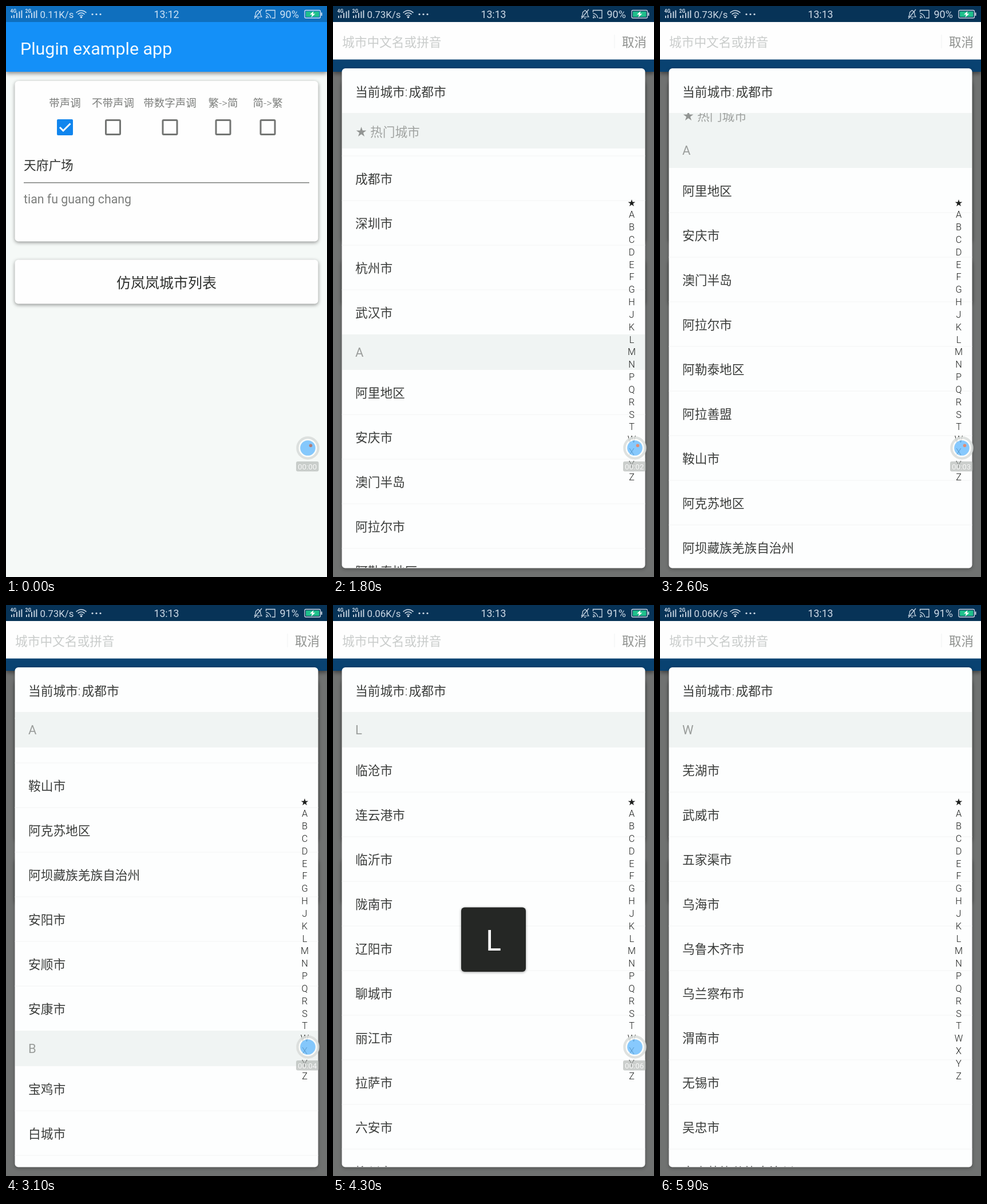
An HTML page with a canvas that plays this animation: 561x998 px, repeating every 6000 ms.

```html
<!DOCTYPE html>
<html lang="zh-CN">
<head>
<meta charset="utf-8">
<title>Plugin example app</title>
<style>
  html, body { margin: 0; width: 100%; height: 100%; overflow: hidden; background: #f5f9f7; }
  canvas { display: block; width: 561px; height: 998px; }
</style>
</head>
<body>
<canvas id="stage" width="561" height="998"></canvas>
<script>
const ctx = document.getElementById('stage').getContext('2d');
const FONT = 'Roboto, "Noto Sans CJK SC", "Noto Sans CJK", sans-serif';
const LOOP = 6000, STEP = 100;
const LIST_TOP = 187, LIST_END = 982, HEAD = 62, ROW = 78;
const LETTERS = '★ABCDEFGHJKLMNPQRSTWXYZ';

// A trailing dot marks a full name; all others get 市.
const CITIES = {
  '★': '北京 广州 成都 深圳 杭州 武汉',
  A: '阿里地区. 安庆 澳门半岛. 阿拉尔 阿勒泰地区. 阿拉善盟. 鞍山 阿克苏地区. 阿坝藏族羌族自治州. 安阳 安顺 安康',
  B: '宝鸡 白城 蚌埠 保定 包头 北海 本溪 滨州 亳州 百色 白山 巴中 保山 白银',
  C: '成都 长沙 重庆 长春 常州 沧州 承德 赤峰 常德 郴州 潮州 滁州 池州 长治',
  D: '大连 东莞 大庆 德州 东营 丹东 大同 德阳 达州 定西 儋州',
  E: '鄂尔多斯 鄂州 恩施土家族苗族自治州.',
  F: '福州 佛山 抚顺 阜新 阜阳 抚州 防城港',
  G: '广州 贵阳 桂林 赣州 广元 广安 贵港 固原 甘孜藏族自治州. 果洛藏族自治州.',
  H: '杭州 合肥 哈尔滨 海口 惠州 湖州 邯郸 衡水 淮安 黄山 菏泽 鹤壁 黄石 衡阳',
  J: '济南 嘉兴 金华 吉林 锦州 晋中 晋城 江门 揭阳 荆州 九江 焦作 济宁',
  K: '昆明 开封 克拉玛依 喀什地区. 可克达拉 昆玉',
  L: '临沧 连云港 临沂 陇南 辽阳 聊城 丽江 拉萨 六安 柳州 洛阳 兰州 廊坊',
  M: '绵阳 马鞍山 茂名 梅州 眉山 牡丹江',
  N: '南京 宁波 南宁 南昌 南通 南充 南阳 内江 宁德 南平 那曲',
  P: '莆田 萍乡 平顶山 濮阳 盘锦 攀枝花 普洱 平凉',
  Q: '青岛 泉州 秦皇岛 衢州 齐齐哈尔 清远 曲靖 钦州 庆阳 七台河',
  R: '日照 日喀则',
  S: '上海 深圳 苏州 沈阳 石家庄 绍兴 汕头 三亚 十堰 商丘 上饶 宿迁',
  T: '天津 太原 唐山 台州 泰州 泰安 通辽 铁岭 铜陵 天水 铜仁',
  W: '芜湖 武威 五家渠 乌海 乌鲁木齐 乌兰察布 渭南 无锡 吴忠 文山壮族苗族自治州. 武汉 潍坊 威海 温州',
  X: '西安 厦门 徐州 湘潭 襄阳 咸阳 邢台 新乡 许昌 信阳',
  Y: '扬州 烟台 银川 宜昌 岳阳 运城 盐城 玉林 宜宾 延安',
  Z: '郑州 珠海 中山 镇江 淄博 株洲 漳州 湛江 肇庆 遵义'
};

let listY = 0;
const sections = [...LETTERS].map(key => {
  const rows = CITIES[key].split(' ').map(n => n.endsWith('.') ? n.slice(0, -1) : n + '市');
  const top = listY;
  listY += HEAD + rows.length * ROW;
  return { key, rows, top, end: listY };
});

const SCROLL = [[1700, 0], [1800, 143], [2600, 496], [3100, 971], [3500, 1130]];
const SCRUB = [[3600, 1], [3700, 1], [4300, 11], [5100, 19]];
const TICKS = [400, 1100, 1900, 2700, 3400, 4100, 4800, 5500];
const BLINKS = [300, 700, 900, 1200, 1900, 2300, 2700, 3400, 4100, 4500, 4800, 5500];

function track(points, t) {
  if (t <= points[0][0]) return points[0][1];
  for (let i = 1; i < points.length; i++) {
    const [t0, a] = points[i - 1], [t1, b] = points[i];
    if (t <= t1) return a + (b - a) * (t - t0) / (t1 - t0);
  }
  return points[points.length - 1][1];
}
const passed = (times, t) => times.filter(x => x <= t).length;

function rect(x, y, w, h, color) {
  ctx.fillStyle = color;
  ctx.fillRect(x, y, w, h);
}
function round(x, y, w, h, r, color) {
  ctx.fillStyle = color;
  ctx.beginPath();
  ctx.roundRect(x, y, w, h, r);
  ctx.fill();
}
function disc(x, y, r, color) {
  ctx.fillStyle = color;
  ctx.beginPath();
  ctx.arc(x, y, r, 0, 7);
  ctx.fill();
}
function line(points, color, width) {
  ctx.strokeStyle = color;
  ctx.lineWidth = width;
  ctx.beginPath();
  points.forEach(([x, y]) => ctx.lineTo(x, y));
  ctx.stroke();
}
function arc(x, y, r, from, to, color, width) {
  ctx.strokeStyle = color;
  ctx.lineWidth = width;
  ctx.beginPath();
  ctx.arc(x, y, r, from, to);
  ctx.stroke();
}
// y is the optical middle of the text.
function text(s, x, y, size, color, align = 'left', weight = 300) {
  ctx.font = `${weight} ${size}px ${FONT}`;
  ctx.textAlign = align;
  ctx.fillStyle = color;
  ctx.fillText(s, x, y + size * 0.35);
}
function shadowed(draw, blur, dy, color) {
  ctx.save();
  ctx.shadowColor = color;
  ctx.shadowBlur = blur;
  ctx.shadowOffsetY = dy;
  draw();
  ctx.restore();
}
const card = (y, h) =>
  shadowed(() => round(15.5, y, 530, h, 6, '#fefefe'), 6, 2, 'rgba(0,0,0,.42)');

function checkbox(x, on) {
  if (on) {
    round(x - 14, 198, 28, 28, 2, '#1085ee');
    line([[x - 9, 212], [x - 3, 218], [x + 9.5, 205.5]], '#fff', 3);
  } else {
    ctx.strokeStyle = '#737573';
    ctx.lineWidth = 3;
    ctx.beginPath();
    ctx.roundRect(x - 12.5, 199.5, 25, 25, 1.5);
    ctx.stroke();
  }
}

function drawHome() {
  rect(0, 0, 561, 998, '#f5f9f7');
  shadowed(() => rect(0, 28, 561, 87, '#1490f8'), 7, 3, 'rgba(0,0,0,.45)');
  rect(0, 0, 561, 28, '#0f6fbe');
  text('Plugin example app', 25, 74, 30.4, '#f4faff', 'left', 400);

  card(131, 280.5);
  [['带声调', 103], ['不带声调', 187], ['带数字声调', 286.5], ['繁->简', 379.5], ['简->繁', 457.5]]
    .forEach(([label, x], i) => {
      text(label, x, 170, 18.5, '#7c7e7c', 'center');
      checkbox(x, i === 0);
    });
  text('天府广场', 31, 278, 21.7, '#303230');
  rect(31, 308, 499, 1.6, '#858785');
  text('tian fu guang chang', 31, 338, 21.35, '#7c7e7c', 'left', 400);

  card(443.5, 77);
  text('仿岚岚城市列表', 280.5, 484, 25, '#303230', 'center');
}

function drawStatus(t) {
  const c = 'rgba(240,247,255,.85)';
  [['4G', 8], ['2G', 34]].forEach(([name, x]) => {
    text(name, x - 0.5, 9.5, 8.5, c, 'left', 600);
    [[1, 4], [5, 5.5], [10, 9], [14.5, 11.5], [18.5, 13.5]]
      .forEach(([dx, h]) => rect(x + dx, 21 - h, 1.8, h, c));
  });
  const speed = t < 1400 ? '0.11' : t < 3400 ? '0.73' : '0.06';
  text(speed + 'K/s', 59.5, 15, 16.8, c, 'left', 400);
  [4, 8, 12].forEach(r => arc(131.5, 20, r, -2.4, -0.74, c, 1.6));
  disc(131.5, 19.5, 1.8, c);
  [151, 158, 165].forEach(x => disc(x, 14.5, 1.6, c));
  text(t < 1100 ? '13:12' : '13:13', 280.5, 15, 17.7, c, 'center', 400);

  line([[434, 19], [436, 16], [436.5, 11], [440.5, 7.5], [444.5, 11], [445, 16], [447, 19], [434, 19]], c, 1.2);
  line([[434, 22], [447, 6]], c, 1.2);
  line([[439, 21.5], [442, 21.5]], c, 1.2);
  line([[454.5, 11], [454.5, 7.5], [470, 7.5], [470, 21], [464.5, 21]], c, 1.3);
  [4, 8].forEach(r => arc(454.5, 21, r, -1.57, 0, c, 1.3));
  disc(455.3, 20.2, 1.3, c);
  text(t < 2900 ? '90%' : '91%', 478.5, 15, 18, c, 'left', 400);

  ctx.strokeStyle = c;
  ctx.lineWidth = 1.3;
  ctx.beginPath();
  ctx.roundRect(522, 7.5, 27.5, 13.5, 2);
  ctx.stroke();
  rect(550.5, 11.5, 2, 5.5, c);
  rect(524, 9.5, 23.5, 9.5, '#20c08c');
  ctx.fillStyle = '#fff';
  ctx.beginPath();
  [[537.5, 9], [531, 15], [535, 15], [533.5, 20], [540.5, 13.5], [536.5, 13.5]]
    .forEach(([x, y]) => ctx.lineTo(x, y));
  ctx.fill();
}

function drawHeader(key, y) {
  rect(16, y, 529, HEAD, '#f0f4f3');
  if (key === '★') {
    text('★', 49.5, y + 33, 19, '#929593', 'center');
    text('热门城市', 65, y + 33, 21.7, '#a0a3a1');
  } else {
    text(key, 39, y + 31.5, 22, '#9a9d9b', 'left', 400);
  }
}

function drawList(scroll) {
  ctx.save();
  ctx.beginPath();
  ctx.rect(15, LIST_TOP, 531, LIST_END - LIST_TOP);
  ctx.clip();
  const base = LIST_TOP - scroll;
  let pinned = sections[0];
  for (const s of sections) {
    if (s.top <= scroll) pinned = s;
    if (base + s.end < LIST_TOP || base + s.top > LIST_END) continue;
    drawHeader(s.key, base + s.top);
    s.rows.forEach((name, i) => {
      const y = base + s.top + HEAD + i * ROW;
      if (y + ROW < LIST_TOP || y > LIST_END) return;
      text(name, 39, y + 40.8, 21.7, '#3a3c3a');
      if (i < s.rows.length - 1) rect(15, y + ROW - 0.5, 531, 1, '#f3f6f5');
    });
  }
  drawHeader(pinned.key, Math.min(LIST_TOP, base + pinned.end - HEAD));
  ctx.restore();
}

function drawPicker(t) {
  const scrub = t >= 3600;
  const section = sections[Math.round(track(SCRUB, t))];

  rect(0, 28, 561, 65.5, '#fefefe');
  text('城市中文名或拼音', 16, 63, 21.7, '#c9cccb');
  rect(491.5, 50, 1, 24, '#f0f2f1');
  text('取消', 505, 63, 21.5, '#8f918f');

  shadowed(() => round(15.5, 109, 530, 873.5, 6, '#fdfefe'), 6, 2, 'rgba(0,0,0,.3)');
  ctx.save();
  ctx.beginPath();
  ctx.roundRect(15.5, 109, 530, 873.5, 6);
  ctx.clip();
  text('当前城市:', 39, 150, 21.7, '#3a3c3a');
  text('成都市', 132.5, 150, 21.7, '#3a3c3a');
  drawList(scrub ? section.top : track(SCROLL, t));
  ctx.restore();

  [...LETTERS].forEach((ch, i) =>
    text(ch, 522, i ? 364.6 + (i - 1) * 21.83 : 344, i ? 16.3 : 13.5, '#1d1f1d', 'center', 350));

  if (scrub && t < 5200) {
    shadowed(() => round(224, 528.5, 113, 112.5, 6, '#252725'), 4, 1, 'rgba(0,0,0,.4)');
    text(section.key, 280.5, 586.5, 49.5, '#fff', 'center', 400);
  }
}

function drawRecorder(t) {
  if (t >= 5900) return;
  ctx.save();
  ctx.globalAlpha = t >= 5800 ? 0.4 : 0.86;
  arc(527.5, 772.5, 18, 0, 7, '#d9dcda', 4.5);
  arc(527.5, 772.5, 14.5, 0, 7, '#fafcfb', 3);
  disc(527.5, 772.5, 13.3, 'rgba(105,188,252,.93)');
  if (passed(BLINKS, t) % 2 === 0) disc(532.5, 768.3, 2.8, t < 1400 ? '#b9705e' : '#f08058');
  round(507, 796, 39.5, 17.5, 3, 'rgba(176,180,178,.75)');
  text('00:0' + passed(TICKS, t), 526.7, 805, 13.4, '#fff', 'center', 400);
  ctx.restore();
}

function draw(t) {
  ctx.globalAlpha = 1;
  drawHome();
  const fade = track([[1300, 0], [1400, 0.35], [1500, 0.8], [1600, 1]], t);
  if (fade > 0) {
    rect(0, 0, 561, 998, `rgba(0,0,0,${0.54 * fade})`);
    ctx.globalAlpha = fade;
    drawPicker(t);
    ctx.globalAlpha = 1;
  }
  drawStatus(t);
  drawRecorder(t);
}

const start = performance.now();
function tick() {
  const t = (performance.now() - start) % LOOP;
  draw(Math.floor(t / STEP) * STEP);
  requestAnimationFrame(tick);
}
tick();
</script>
</body>
</html>
```
